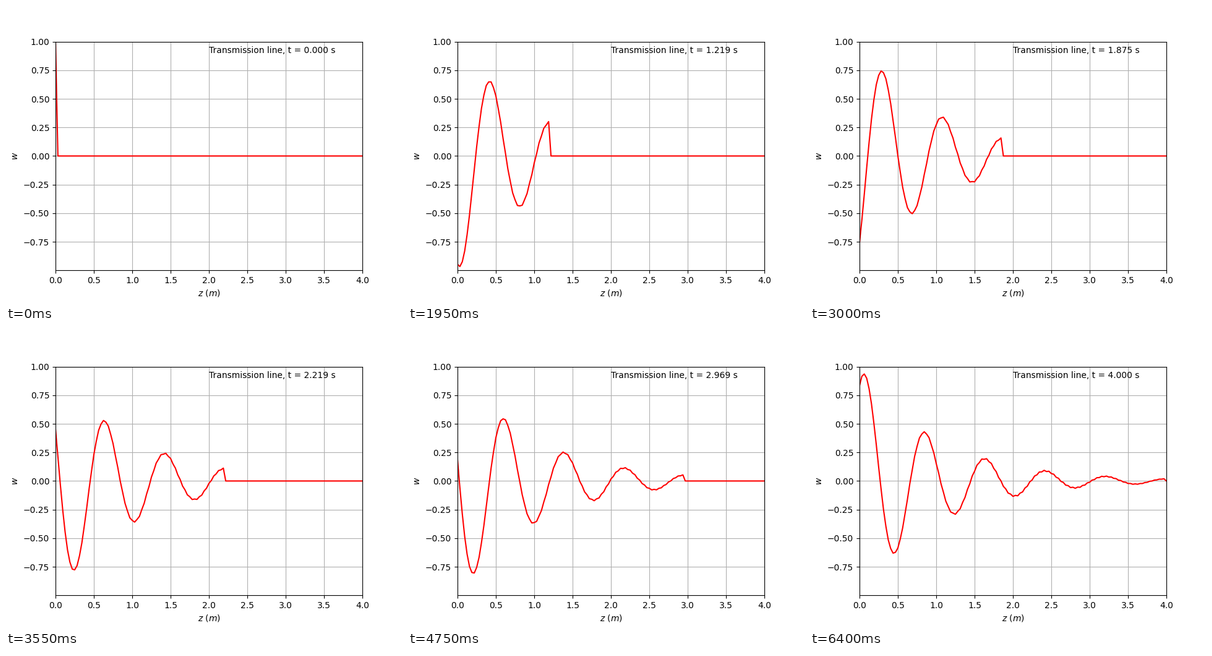
Recreate the animation shown at these times as a matplotlib script. Size 640 px wide and 480 px high, loop 6450 ms.

```python
import numpy as np
import matplotlib.pyplot as plt
from matplotlib.animation import FuncAnimation

LENGTH, CELLS = 4.0, 128
OMEGA = 8.0
STEP = LENGTH / CELLS          # same step in space and time (unit wave speed)


def solve():
    """Damped telegraph equation w_tt + 2 w_t + w = w_zz, driven at z = 0."""
    w = np.zeros((CELLS + 1, CELLS + 1))
    w[:, 0] = np.cos(OMEGA * times)
    for n in range(1, CELLS):
        now, before = w[n], w[n - 1]
        w[n + 1, 1:-1] = (
            now[2:] + now[:-2]
            - (1 - STEP) * before[1:-1]
            - STEP**2 * now[1:-1]
        ) / (1 + STEP)
    return w


z = np.linspace(0, LENGTH, CELLS + 1)
times = STEP * np.arange(CELLS + 1)
wave = solve()

fig, ax = plt.subplots(figsize=(6.4, 4.8), dpi=100)
ax.set_xlim(0, LENGTH)
ax.set_ylim(wave.min(), wave.max())
ax.set_xlabel("$z$ ($m$)")
ax.set_ylabel("$w$")
ax.grid(True)
line, = ax.plot(z, wave[0], "r")
label = ax.text(2, 0.9, "")


def update(n):
    line.set_ydata(wave[n])
    label.set_text(f"Transmission line, t = {times[n]:.3f} s")
    return line, label


anim = FuncAnimation(fig, update, frames=CELLS + 1, interval=50,
                     repeat=True, repeat_delay=0)
plt.show()
```
